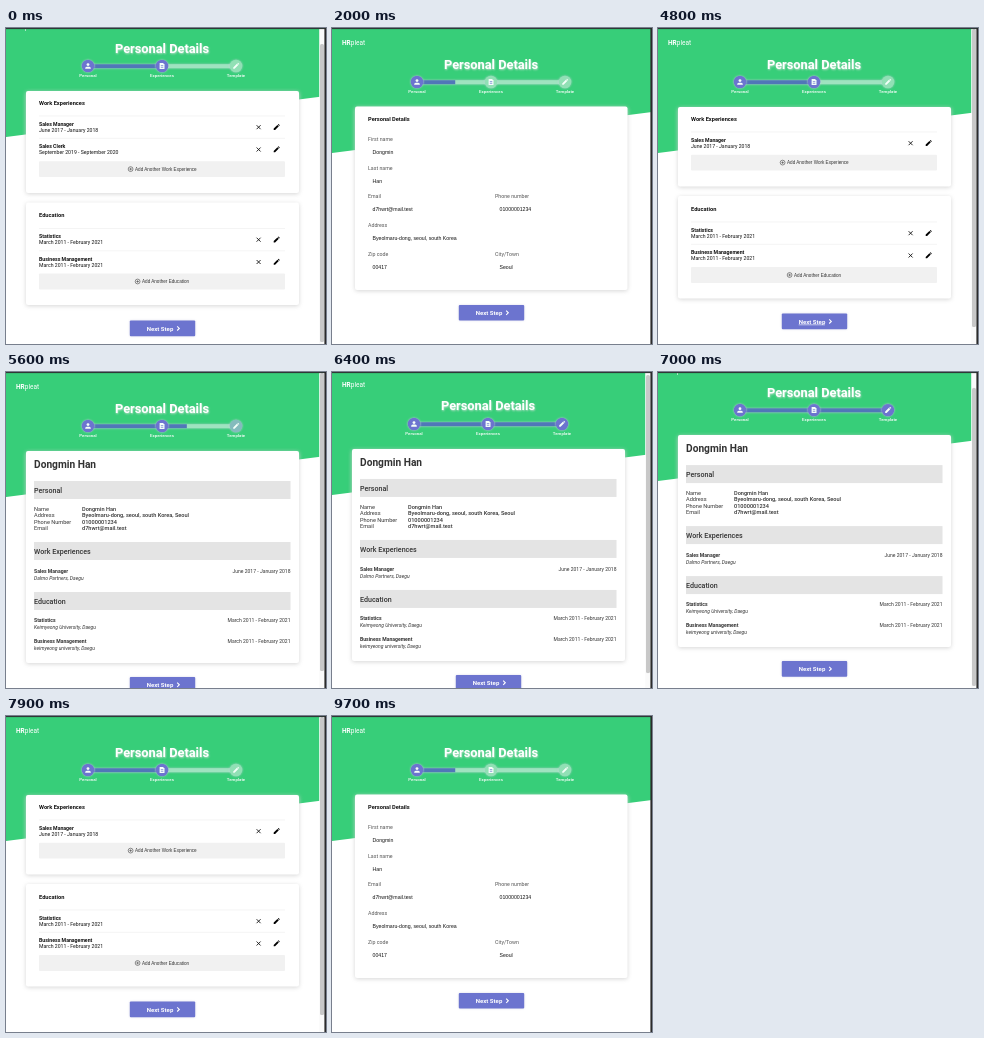
Animation, 320 px wide and 316 px high, one loop 9900 ms. Source, as an HTML page:

```html
<!DOCTYPE html>
<html lang="en">
<head>
<meta charset="utf-8">
<title>Resume builder</title>
<style>
  html, body { margin: 0; width: 100%; height: 100%; overflow: hidden; background: #fff; }
  svg { display: block; width: 320px; height: 316px; }
  text { font-family: Roboto, sans-serif; fill: #111; white-space: pre; }
  .bold { font-weight: 700; }
  .medium { font-weight: 500; }
  .italic { font-style: italic; }
  .arial { font-family: "Liberation Sans", Arial, sans-serif; }
  .label { fill: #555; }
  .dark { fill: #333; }
  .white { fill: #fff; }
  .mid { text-anchor: middle; }
  .end { text-anchor: end; }
  .title { fill: #fff; font-weight: 700; text-shadow: .5px 1px 2px rgba(225, 225, 225, .75); }
  .card { fill: #fff; filter: drop-shadow(0 1.5px 2px rgba(212, 212, 212, .95)); }
  .soft { filter: drop-shadow(0 .5px 1px rgba(205, 205, 225, .7)); }
  .rule { stroke: #ececec; stroke-width: .6; }

  /* One shared 9.9 s loop; "cut" parts change without easing. */
  .anim { animation: 9.9s linear infinite; }
  .cut { animation: 9.9s step-end infinite; }
  #page { animation-name: scroll; }
  #thumb { animation-name: thumb; }
  #head { animation-name: shift; }
  #next { animation-name: next; }
  #form { animation-name: form; }
  #exp { animation-name: exp; }
  #tpl { animation-name: tpl; }
  #clerk { animation-name: clerk; }
  #workCard { animation-name: workCard; }
  #lower, #addWork { animation-name: lower; }
  #underline { animation-name: underline; }
  #track { animation-name: track; }
  #bar { animation-name: grow; transform-origin: 82px 0; }
  #on1 { animation-name: on1; }
  #on2 { animation-name: on2; }

  @keyframes scroll {
    0%, 11.111% { transform: translateY(-16px); }
    14.141%, 62.626% { transform: none; }
    64.646% { transform: translateY(-2px); }
    67.677%, 70.707% { transform: translateY(-16px); }
    72.727%, 100% { transform: none; }
  }
  @keyframes thumb {
    0%, 11.111% { transform: translateY(15px); }
    14.141%, 62.626% { transform: none; }
    64.646% { transform: translateY(2px); }
    67.677%, 70.707% { transform: translateY(15px); }
    72.727%, 100% { transform: none; }
  }
  @keyframes shift {
    0% { transform: none; }
    15.152% { transform: translateX(3px); }
    24.242% { transform: none; }
    86.869%, 100% { transform: translateX(3px); }
  }
  @keyframes next {
    0% { transform: translate(0, 308.6px); }
    15.152% { transform: translate(3px, 277px); }
    24.242% { transform: translate(0, 308.6px); }
    41.414% { transform: translate(0, 285.6px); }
    55.556% { transform: translate(0, 305px); }
    77.778% { transform: translate(0, 285.6px); }
    86.869%, 100% { transform: translate(3px, 277px); }
  }
  @keyframes form {
    0% { visibility: hidden; }
    15.152% { visibility: visible; }
    24.242% { visibility: hidden; }
    86.869%, 100% { visibility: visible; }
  }
  @keyframes exp {
    0% { opacity: 1; }
    15.152% { opacity: 0; }
    24.242% { opacity: 1; }
    55.556% { opacity: 0; }
    77.778% { opacity: 1; }
    86.869%, 100% { opacity: 0; }
  }
  @keyframes tpl {
    0% { visibility: hidden; }
    55.556% { visibility: visible; }
    77.778%, 100% { visibility: hidden; }
  }
  @keyframes track {
    0% { visibility: visible; }
    15.152% { visibility: hidden; }
    24.242% { visibility: visible; }
    86.869%, 100% { visibility: hidden; }
  }
  @keyframes clerk {
    0% { visibility: visible; }
    41.414%, 100% { visibility: hidden; }
  }
  @keyframes workCard {
    0% { height: 102px; }
    41.414%, 100% { height: 79.5px; }
  }
  @keyframes lower {
    0% { transform: translateY(22.5px); }
    41.414%, 100% { transform: none; }
  }
  @keyframes underline {
    0% { visibility: hidden; }
    46.465% { visibility: visible; }
    55.556%, 100% { visibility: hidden; }
  }
  @keyframes grow {
    0%, 15.152% { transform: scaleX(.5); }
    19.192%, 24.242% { transform: scaleX(.26); }
    28.283%, 55.556% { transform: scaleX(.5); }
    58.586%, 77.778% { transform: scaleX(1); }
    79.798%, 86.869% { transform: scaleX(.5); }
    91.919%, 100% { transform: scaleX(.26); }
  }
  @keyframes on1 {
    0%, 15.152% { opacity: 1; }
    19.192%, 24.242% { opacity: 0; }
    28.283%, 86.869% { opacity: 1; }
    91.919%, 100% { opacity: 0; }
  }
  @keyframes on2 {
    0%, 55.556% { opacity: 0; }
    58.586%, 77.778% { opacity: 1; }
    79.798%, 100% { opacity: 0; }
  }
</style>
</head>
<body>
<svg id="stage" viewBox="0 0 320 316"></svg>
<script>
  const GREEN = '#37ce79', BLUE = '#6c74cf';
  const person = { name: 'Dongmin Han', first: 'Dongmin', last: 'Han', mail: 'd7hwrt@mail.test',
    phone: '01000001234', address: 'Byeolmaru-dong, seoul, south Korea', zip: '00417', city: 'Seoul' };
  const jobDate = 'June 2017 - January 2018', studyDate = 'March 2011 - February 2021';

  // Text placed by the vertical centre of its capitals.
  const text = (x, y, size, str, cls = '') =>
    `<text x="${x}" y="${(y + size * .355).toFixed(2)}" font-size="${size}" class="${cls}">${str}</text>`;
  const rect = (x, y, w, h, fill, more = '') =>
    `<rect x="${x}" y="${y}" width="${w}" height="${h}" fill="${fill}" ${more}/>`;
  const card = (x, y, w, h, more = 'class="card"') => rect(x, y, w, h, '#fff', `rx="2" ${more}`);
  const group = (id, kind, body) => `<g id="${id}" class="${kind}">${body}</g>`;
  const rule = y => `<path class="rule" d="M33 ${y}H279"/>`;

  const icons = [
    '<circle cy="-1.4" r="1.4"/><path d="M-2.8 2.7V2C-2.8 .2 2.8 .2 2.8 2V2.7Z"/>',
    `<path d="M-2.4 -3H1L2.5 -1.5V3H-2.4Z"/><path d="M-1.2 -.4H1.3M-1.2 1.3H1.3" stroke="${BLUE}" stroke-width=".7"/>`,
    '<path d="M-2.8 2.8V1.4L.9 -2.3L2.3 -.9L-1.4 2.8ZM1.3 -2.7L2 -3.3L3.3 -2L2.7 -1.3Z"/>'
  ];

  const step = (i, name) => {
    const x = 82 + 74 * i;
    const active = `<circle cx="${x}" cy="54" r="6.3" fill="${BLUE}" ${i ? `id="on${i}" class="anim"` : ''}/>`;
    return `<circle class="soft" cx="${x}" cy="54" r="6.3" fill="#91e0b5"/>${active}
      <g transform="translate(${x} 54)" fill="#f4fff9">${icons[i]}</g>` +
      text(x, 63.5, 4.4, name, 'white medium mid');
  };

  const head = () => text(156, 36, 12.8, 'Personal Details', 'title mid') +
    `<g class="soft">${rect(82, 52.2, 148, 4, '#9fe3c0')}
      ${rect(82, 52.2, 148, 4, '#5077b8', 'id="bar" class="anim"')}</g>` +
    ['Personal', 'Experiences', 'Template'].map((name, i) => step(i, name)).join('');

  const field = (x, row, label, value) => {
    const y = 111 + 28.7 * row;
    return text(x, y, 5.25, label, 'label') + text(x + 4.5, y + 13, 5.2, value, 'arial');
  };

  const form = () => card(23, 78.5, 272.5, 183.5) +
    text(36, 91, 5.7, 'Personal Details', 'bold') +
    field(36, 0, 'First name', person.first) + field(36, 1, 'Last name', person.last) +
    field(36, 2, 'Email', person.mail) + field(163, 2, 'Phone number', person.phone) +
    field(36, 3, 'Address', person.address) +
    field(36, 4, 'Zip code', person.zip) + field(163, 4, 'City/Town', person.city);

  const entry = (y, title, date) => rule(y - 8) +
    text(33, y, 5.2, title, 'bold') + text(33, y + 6, 5.15, date) +
    `<path d="M250.6 ${y + 1.2}l4 4m0 -4l-4 4" stroke="#111" stroke-width=".9"/>
     <g transform="translate(270.5 ${y + 3.2})">${icons[2]}</g>`;

  const addButton = (y, x, str) => rect(33, y, 246, 15.8, '#f1f1f1', 'rx="1"') +
    `<g stroke="#444" stroke-width=".6" fill="none" transform="translate(${x - 4.4} ${y + 7.9})">
       <circle r="2.4"/><path d="M-1.3 0H1.3M0 -1.3V1.3"/></g>` +
    text(x, y + 7.9, 4.62, str, 'arial dark');

  const experiences = () => card(20, 79, 273, 102, 'id="workCard" class="card cut"') +
    text(33, 91, 5.7, 'Work Experiences', 'bold') +
    entry(112, 'Sales Manager', jobDate) +
    group('clerk', 'cut', entry(134.3, 'Sales Clerk', 'September 2019 - September 2020')) +
    group('addWork', 'cut', addButton(126.7, 129, 'Add Another Work Experience')) +
    group('lower', 'cut', card(20, 168, 273, 102.5) +
      text(33, 180.8, 5.7, 'Education', 'bold') +
      entry(202, 'Statistics', studyDate) + entry(224.3, 'Business Management', studyDate) +
      addButton(239.1, 136, 'Add Another Education'));

  const section = (y, name) => rect(28, y, 256.5, 18, '#e4e4e4') + text(28, y + 9.2, 7.1, name, 'medium dark');
  const info = (i, key, value) => {
    const y = 136.8 + 6.5 * i;
    return text(28, y, 5.6, key, 'dark') + text(76, y, 5.6, value, 'medium dark');
  };
  const record = (y, title, place, date) => text(28, y, 5.1, title, 'bold dark') +
    text(28, y + 7, 5, place, 'italic dark') + text(284.5, y, 5.05, date, 'end dark');

  const template = () => card(20, 79, 273, 212) +
    text(28, 92.2, 10.2, person.name, 'bold dark') +
    section(109, 'Personal') + info(0, 'Name', person.name) +
    info(1, 'Address', `${person.address}, ${person.city}`) +
    info(2, 'Phone Number', person.phone) + info(3, 'Email', person.mail) +
    section(170, 'Work Experiences') + record(199, 'Sales Manager', 'Dalmo Partners, Daegu', jobDate) +
    section(220, 'Education') +
    record(248, 'Statistics', 'Keimyeong University, Daegu', studyDate) +
    record(269.5, 'Business Management', 'keimyeong university, Daegu', studyDate);

  const nextButton = () => rect(123.8, 0, 65.4, 15.6, BLUE, 'rx="1" class="soft"') +
    text(140.7, 7.8, 6.05, 'Next Step', 'bold white') +
    '<path d="M171.2 5.7l2.1 2.1l-2.1 2.1" fill="none" stroke="#fff" stroke-width="1.1"/>' +
    '<path id="underline" class="cut" d="M140.7 11.2H167" stroke="#fff" stroke-width=".6"/>';

  document.getElementById('stage').innerHTML =
    rect(0, 0, 320, 316, '#fff') +
    group('page', 'anim',
      `<path d="M0 0H320V84L0 125Z" fill="${GREEN}"/>` +
      text(10, 15, 6.5, '<tspan font-weight="700">HR</tspan>pleat', 'white') +
      group('head', 'cut', head()) +
      group('form', 'cut', form()) +
      group('exp', 'cut', experiences()) +
      group('tpl', 'cut', template()) +
      group('next', 'cut', nextButton())) +
    group('track', 'cut', rect(313.2, 0, 6, 316, '#fafafa') +
      rect(314, 1, 4, 298, '#c8c8c8', 'rx="1.5" id="thumb" class="anim"')) +
    rect(0, 0, 320, 1.1, '#2f3836') + rect(318.4, 0, 1.6, 316, '#2b2b2b');
</script>
</body>
</html>
```
